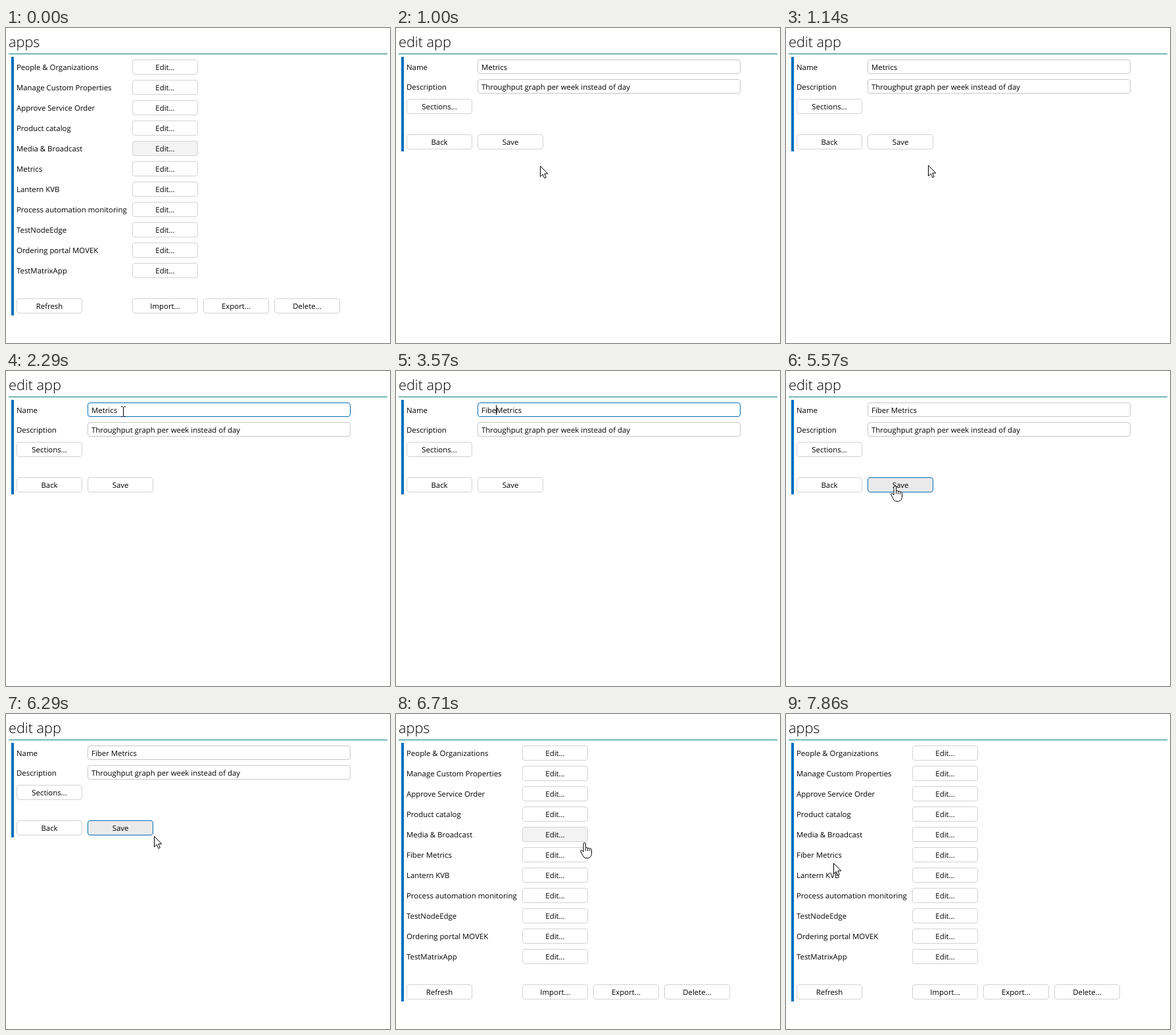
Recreate the animation shown at these times as an HTML page with a canvas. Size 584 px wide and 480 px high, loop 8000 ms.

```html
<!DOCTYPE html>
<html lang="en">
<head>
<meta charset="utf-8">
<title>Edit app</title>
<style>
html, body { margin: 0; width: 100%; height: 100%; overflow: hidden; background: #fff; }
canvas { display: block; }
</style>
</head>
<body>
<canvas id="stage" width="584" height="480"></canvas>
<script>
const ctx = document.getElementById('stage').getContext('2d');
const LOOP = 8000, BLUE = '#036dbb', FONT = '"Open Sans", "Noto Sans", sans-serif';
const BODY = `11.4px ${FONT}`, TITLE = `300 21.7px ${FONT}`;
ctx.textRendering = 'geometricPrecision';

// Pointer path: step, x, y
const TRACK = [
  [0, 240, 184], [1, 236, 187], [3, 232, 212], [5, 224, 212], [8, 216, 209], [9, 216, 209],
  [14, 178, 62], [17, 178, 62], [18, 131, 62], [19, 134, 84], [33, 134, 84], [37, 166, 175],
  [43, 166, 175], [45, 284, 196], [46, 284, 196], [47, 287, 196], [54, 241, 157], [55, 72, 227]
];
const ARROW = new Path2D('M.5.5V16.5L4.2 13L6.8 18.8L9.3 17.7L6.8 12H11.8Z');
const HAND = new Path2D('M-2 14V2a1.8 1.8 0 0 1 3.6 0V8.5a1.6 1.6 0 0 1 3.1.5a1.6 1.6 0 0 1 3 .7a1.6 1.6 0 0 1 2.8 1V16c0 4-2 7.5-6 7.5H2c-3 0-4-2-5-4l-3-5.5c-1-2 1-3 2.2-2z');
const FINGERS = new Path2D('M1.6 8.5v4M4.7 9v4M7.7 9.7v3');
const BEAM = new Path2D('M-3-7.5h2.5l1 1l1-1h2.5M.5-6.5v13M-3 7.5h2.5l1-1l1 1h2.5');

let pointer, shape;

function pointerAt(step) {
  const i = TRACK.findLastIndex(p => p[0] <= step);
  const [k, x, y] = TRACK[i], [k2, x2, y2] = TRACK[i + 1] || [k + 1, x, y];
  const f = (step - k) / (k2 - k);
  return { x: Math.round(x + (x2 - x) * f), y: Math.round(y + (y2 - y) * f) };
}

function text(str, x, y, align = 'left', font = BODY) {
  ctx.font = font;
  ctx.fillStyle = '#000';
  ctx.textAlign = align;
  ctx.fillText(str, x, y);
}

function box(x, y, w, h, fill, border) {
  ctx.beginPath();
  ctx.roundRect(x + .5, y + .5, w - 1, h - 1, 3.5);
  ctx.fillStyle = fill;
  ctx.fill();
  ctx.strokeStyle = border;
  ctx.lineWidth = 1;
  ctx.stroke();
}

const over = (x, y, w, h) => pointer.x >= x && pointer.x <= x + w &&
  pointer.y >= y - 2 && pointer.y <= y + h + 2;

function button(label, x, y, focus) {
  const hover = over(x, y, 100, 23);
  if (hover) shape = 'hand';
  box(x, y, 100, 23, focus ? '#eaeaea' : hover ? '#f3f3f3' : '#fff', focus ? BLUE : '#d2d2d2');
  text(label, x + 50, y + 16, 'center');
}

function field(label, value, y, focus) {
  if (over(124, y, 400, 22)) shape = 'beam';
  text(label, 16, y + 16);
  box(124, y, 400, 22, '#fff', focus ? BLUE : '#c6c6c6');
  text(value, 130, y + 16);
}

function frame(title, bottom) {
  text(title, 4, 29, 'left', TITLE);
  ctx.fillStyle = '#008075';
  ctx.fillRect(4, 39, 576, 1);
  ctx.fillStyle = BLUE;
  ctx.fillRect(8, 44, 4, bottom - 44);
}

function listPage(step) {
  frame('apps', 438);
  const rows = ['People & Organizations', 'Manage Custom Properties', 'Approve Service Order',
    'Product catalog', 'Media & Broadcast', step < 47 ? 'Metrics' : 'Fiber Metrics', 'Lantern KVB',
    'Process automation monitoring', 'TestNodeEdge', 'Ordering portal MOVEK', 'TestMatrixApp'];
  rows.forEach((label, i) => {
    text(label, 16, 64 + i * 31);
    button('Edit...', 192, 48 + i * 31, step === 4 && i === 5);
  });
  button('Refresh', 16, 412);
  ['Import...', 'Export...', 'Delete...'].forEach((label, i) => button(label, 192 + i * 108, 412));
}

function editPage(step) {
  frame('edit app', 188);
  const count = Math.max(0, Math.min(6, Math.floor((step - 20) * .75 + .25)));
  const typed = 'Fiber '.slice(0, count);
  const editing = step >= 15 && step < 38;
  field('Name', typed + 'Metrics', 48, editing);
  field('Description', 'Throughput graph per week instead of day', 78);
  if (editing && step >= 18) {
    ctx.fillStyle = '#000';
    ctx.fillRect(Math.round(129.5 + ctx.measureText(typed).width), 52, 1, 15);
  }
  button('Sections...', 16, 108);
  button('Back', 16, 162);
  button('Save', 124, 162, step >= 38);
}

function drawPointer() {
  ctx.save();
  ctx.translate(pointer.x, pointer.y);
  ctx.strokeStyle = '#000';
  ctx.fillStyle = '#fff';
  ctx.lineWidth = 1;
  if (shape !== 'beam') ctx.fill(shape === 'hand' ? HAND : ARROW);
  ctx.stroke({ arrow: ARROW, hand: HAND, beam: BEAM }[shape]);
  if (shape === 'hand') ctx.stroke(FINGERS);
  ctx.restore();
}

function draw(now) {
  // Seven steps a second, each start rounded to 10 ms
  const step = Math.floor((Math.floor(now % LOOP / 10) + .5) * .07);
  pointer = pointerAt(step);
  shape = 'arrow';
  ctx.fillStyle = '#fff';
  ctx.fillRect(0, 0, 584, 480);
  (step >= 5 && step < 47 ? editPage : listPage)(step);
  const hidden = step === 0 || (step >= 21 && step < 33);
  if (!hidden) drawPointer();
  requestAnimationFrame(draw);
}
requestAnimationFrame(draw);
</script>
</body>
</html>
```
